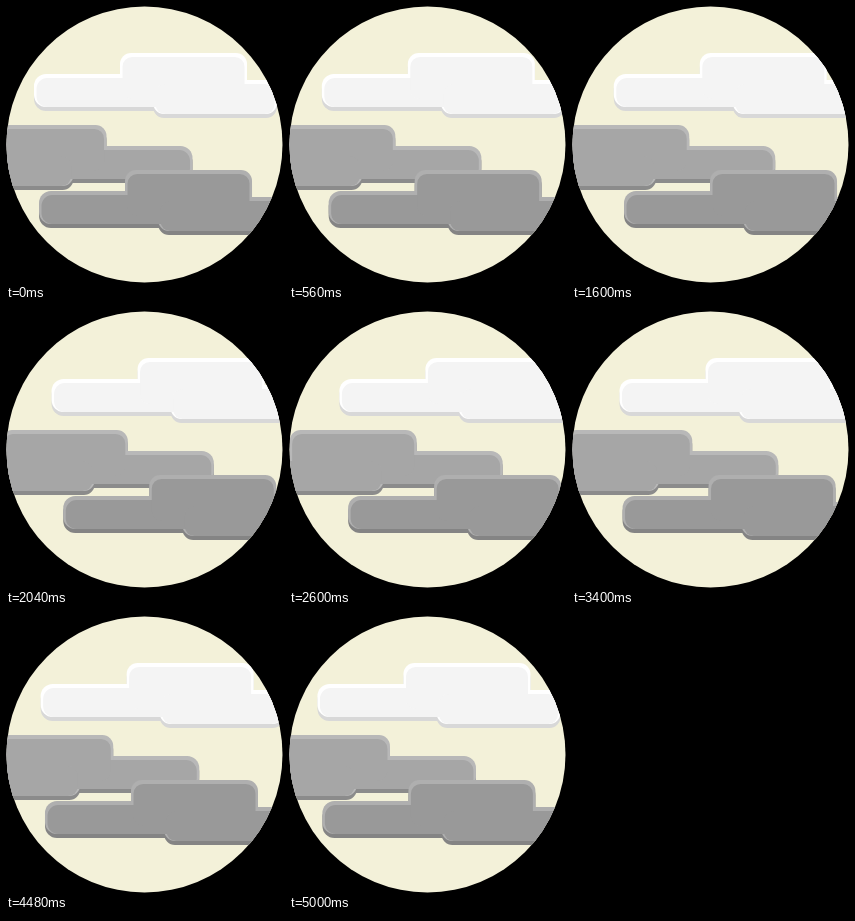
An HTML page with a canvas for the animation above (5040 ms loop, 277 px wide and 277 px high).

```html
<!DOCTYPE html>
<html lang="en">
<head>
<meta charset="utf-8">
<title>Drifting clouds</title>
<style>
  html, body { margin: 0; width: 100%; height: 100%; overflow: hidden; background: #000; }
  canvas { display: block; width: 100vw; height: 100vh; }
</style>
</head>
<body>
<canvas id="stage"></canvas>
<script>
const SIZE = 277;
const LOOP = 5040;
const CLOUD_WIDTH = 243;
const canvas = document.getElementById('stage');
const ctx = canvas.getContext('2d');

// Parts of one cloud: x, y, width, height, corner radius
const PARTS = [
  [0, 21, 160, 37, 12],
  [86, 0, 127, 50, 11],
  [119, 27, 124, 38, 11]
];

const CLOUDS = [
  { x: 28, y: 47, reach: 25.2, turn: 2925, light: '#ffffff', body: '#f4f4f4', dark: '#d8d8d8' },
  { x: -56.5, y: 119, reach: 28.2, turn: 2700, mirror: true, light: '#b8b8b8', body: '#a6a6a6', dark: '#8b8b8b' },
  { x: 33, y: 164, reach: 28.4, turn: 2390, light: '#afafaf', body: '#999999', dark: '#848484' }
];

function fillParts(color, side, top, bottom) {
  ctx.fillStyle = color;
  for (const [x, y, w, h, r] of PARTS) {
    ctx.beginPath();
    ctx.roundRect(x + side, y + top, w - 2 * side, h - top - bottom, r - side / 2);
    ctx.fill();
  }
}

function drawCloud(cloud, time) {
  const { turn, reach } = cloud;
  const drift = reach * (time < turn ? time / turn : (LOOP - time) / (LOOP - turn));
  ctx.save();
  ctx.translate(cloud.x + drift, cloud.y);
  if (cloud.mirror) {
    ctx.translate(CLOUD_WIDTH, 0);
    ctx.scale(-1, 1);
  }
  fillParts(cloud.dark, 0, 4, 0);
  fillParts(cloud.light, 0, 0, 4);
  fillParts(cloud.body, 2.5, 4, 4);
  ctx.restore();
}

function draw(time) {
  const ratio = window.devicePixelRatio || 1;
  const width = Math.round(innerWidth * ratio);
  const height = Math.round(innerHeight * ratio);
  if (canvas.width !== width || canvas.height !== height) {
    canvas.width = width;
    canvas.height = height;
  }
  ctx.setTransform(width / SIZE, 0, 0, height / SIZE, 0, 0);
  ctx.fillStyle = '#000';
  ctx.fillRect(0, 0, SIZE, SIZE);
  ctx.save();
  ctx.beginPath();
  ctx.arc(SIZE / 2, SIZE / 2, 138, 0, 2 * Math.PI);
  ctx.clip();
  ctx.fillStyle = '#f3f1d9';
  ctx.fillRect(0, 0, SIZE, SIZE);
  for (const cloud of CLOUDS) drawCloud(cloud, time);
  ctx.restore();
}

const start = performance.now();
function tick() {
  draw((performance.now() - start) % LOOP);
  requestAnimationFrame(tick);
}
tick();
</script>
</body>
</html>
```
